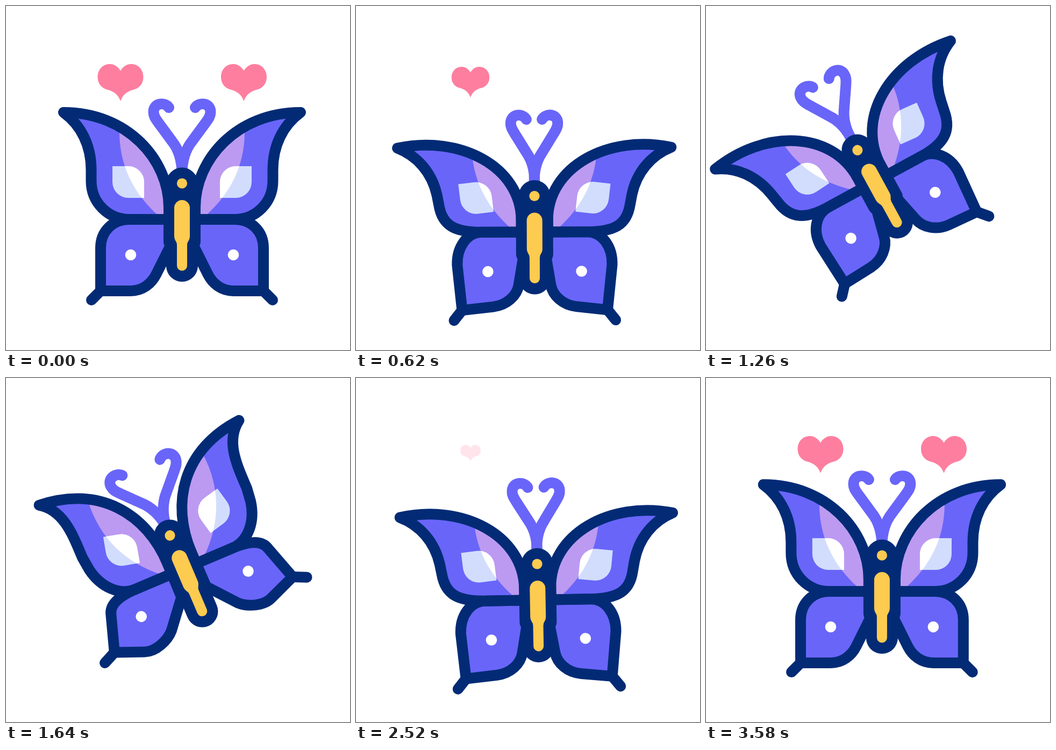
Write an HTML page with a canvas that moves like this. It is 640x640 px and loops after 3600 ms.

```html
<!DOCTYPE html>
<html lang="en">
<head>
<meta charset="utf-8">
<title>Butterfly</title>
<style>
html, body { margin: 0; width: 100%; height: 100%; overflow: hidden; background: #fff; }
canvas { display: block; width: 640px; height: 640px; }
</style>
</head>
<body>
<canvas id="stage" width="640" height="640"></canvas>
<script>
const ctx = document.getElementById('stage').getContext('2d');
const LOOP = 3600;
const NAVY = '#032b75', PURPLE = '#6965f9', LILAC = '#bc9af2', PALE = '#d2ddfd',
      GOLD = '#fdcb50', PINK = '#fe7e9f';

// Left half of the butterfly, measured from the head dot.
const REST = {
  upper: [-220.5,-132, -102.5,-132, -24.5,-45, -187.5,-108, -169,-70, -169,-25, -169,-5, -169,36, -137.5,67],
  lower: [-130,67, -151.5,90, -151.5,120, -151.5,200, -95.5,200, -74,200, -57,187, -48,169, -21.5,116],
  tail: [-168.5,217], dot: [-95.5,133], eye: [-100,-2.5, 0], feeler: [0]
};
const DOWN = {
  upper: [-255,-89.5, -139,-114.5, -25,-55, -218,-75, -190.5,-44, -181.5,-2, -178,16, -172,55, -148,67],
  lower: [-126,67, -145,95, -144,128.5, -135,212.5, -77,206, -52,203, -33,186, -29.5,165, -21,113],
  tail: [-150,231.5], dot: [-87,140.5], eye: [-109,3.5, -6.8], feeler: [4.7]
};
const UP = {
  upper: [-202,-147, -84.5,-138, -24.5,-55, -163,-121, -166,-70, -166,-25, -163,0, -156,38, -130,67],
  lower: [-125,67, -153,72, -158.5,93, -180,160, -128,181, -108,189, -80,178, -66.5,164, -25,114],
  tail: [-204,171], dot: [-108,118], eye: [-93.5,-10.4, 13.3], feeler: [-6.5]
};
const FLAPS = [[0, REST], [600, DOWN], [1000, UP], [1330, DOWN], [1640, UP], [1940, DOWN],
  [2240, UP], [2550, DOWN], [2840, UP], [3230, DOWN], [LOOP, REST]];

// time, x, y, tilt in degrees
const FLIGHT = [[0, 327.5, 330, 0], [540, 328, 350.5, 0], [620, 332, 353.5, -0.2],
  [920, 284, 267, -28.4], [1020, 267, 240, -31.5], [1330, 287, 276, -27.5],
  [1640, 305, 293, -23], [1940, 318, 306, -18.5], [2240, 325, 317, -14],
  [2520, 337, 346, -1], [2820, 322, 349, 3.6], [3020, 312, 345, 2.4],
  [3230, 313.5, 335, 0.6], [LOOP, 327.5, 330, 0]];

// time, scale
const LEFT_HEART = [[0, 1], [430, 1.37], [620, 0.83], [740, 0.3], [2440, 0.3], [2520, 0.447],
  [2700, 0.93], [2860, 1.37], [3020, 1.088], [3100, 1], [LOOP, 1]];
const RIGHT_HEART = [[0, 1], [230, 1.37], [560, 0.3], [2720, 0.3], [3020, 0.93],
  [3210, 1.37], [3440, 1], [LOOP, 1]];

const rad = deg => deg * Math.PI / 180;
const clamp = v => Math.max(0, Math.min(1, v));

function segment(keys, t) {
  let i = 0;
  while (i < keys.length - 2 && t >= keys[i + 1][0]) i++;
  return i;
}

// Monotone cubic through the keys: no overshoot, rest at every turning point.
function track(keys, t, col) {
  const rate = i => (keys[i + 1][col] - keys[i][col]) / (keys[i + 1][0] - keys[i][0]);
  const slope = i => {
    if (i === 0 || i === keys.length - 1) return 0;
    const a = rate(i - 1), b = rate(i);
    return a * b > 0 ? 2 * a * b / (a + b) : 0;
  };
  const i = segment(keys, t), span = keys[i + 1][0] - keys[i][0];
  const u = (t - keys[i][0]) / span, v = 1 - u;
  return keys[i][col] * v * v * (1 + 2 * u) + keys[i + 1][col] * u * u * (3 - 2 * u)
    + span * (slope(i) * u * v * v - slope(i + 1) * u * u * v);
}

function poseAt(t) {
  const i = segment(FLAPS, t), [t0, a] = FLAPS[i], [t1, b] = FLAPS[i + 1];
  const k = (1 - Math.cos(Math.PI * (t - t0) / (t1 - t0))) / 2;
  const pose = {};
  for (const part in a) pose[part] = a[part].map((v, n) => v + (b[part][n] - v) * k);
  return pose;
}

function paint(path, fill, line) {
  if (fill) { ctx.fillStyle = fill; ctx.fill(path); }
  if (line) { ctx.strokeStyle = line; ctx.stroke(path); }
}

function disc(x, y, r, fill) {
  const p = new Path2D();
  p.arc(x, y, r, 0, Math.PI * 2);
  paint(p, fill);
}

function upperPath(q) {
  const p = new Path2D();
  p.moveTo(q[0], q[1]);
  p.bezierCurveTo(q[2], q[3], q[4], q[5], -24.5, 45);
  p.lineTo(-24.5, 67);
  p.lineTo(-97.5, 67);
  p.bezierCurveTo(q[16], q[17], q[14], q[15], q[12], q[13]);
  p.lineTo(q[10], q[11]);
  p.bezierCurveTo(q[8], q[9], q[6], q[7], q[0], q[1]);
  p.closePath();
  return p;
}

function lowerPath(q) {
  const p = new Path2D();
  p.moveTo(-24.5, 67);
  p.lineTo(-97.5, 67);
  p.bezierCurveTo(...q.slice(0, 6));
  p.lineTo(q[6], q[7]);
  p.lineTo(q[8], q[9]);
  p.bezierCurveTo(...q.slice(10, 16));
  p.lineTo(q[16], q[17]);
  p.closePath();
  return p;
}

const sheen = new Path2D('M-112-160L-115.5-115C-122-45-95 15-44 60L-20 80L0 80L0-160Z');
const eyeShape = new Path2D('M-29.5-29.5H0A29.5 29.5 0 0 1 29.5 0V29.5H0A29.5 29.5 0 0 1-29.5 0Z');
const feelerShape = new Path2D('M-24.5-141C-32-152-53-150-53-133C-53-124-48-119-44-113L-19-79C-15-74 0-55 0-18');
const bodyShape = new Path2D('M-29.5 0A29.5 29.5 0 0 1 29.5 0L34.5 40V108Q34.5 115 29.5 121V153.5A29.5 29.5 0 0 1-29.5 153.5V121Q-34.5 115-34.5 108V40Z');
const goldShape = new Path2D('M-14.5 45.5A14.5 14.5 0 0 1 14.5 45.5V99Q14.5 103 12 107Q9.5 110 9.5 115V153A9.5 9.5 0 0 1-9.5 153V115Q-9.5 110-12 107Q-14.5 103-14.5 99Z');
const heartShape = new Path2D('M0-17C-5-25-12-29.4-19.5-29.4C-33-29.4-42.5-19-42.5-5.5C-42.5 7-35 16-23 18.5C-12 21.5-4 28 0 39.6C4 28 12 21.5 23 18.5C35 16 42.5 7 42.5-5.5C42.5-19 33-29.4 19.5-29.4C12-29.4 5-25 0-17Z');

function drawEye([x, y, turn], fill) {
  ctx.save();
  ctx.translate(x, y);
  ctx.rotate(rad(turn));
  paint(eyeShape, fill);
  ctx.restore();
}

function drawFeeler(pose) {
  ctx.save();
  ctx.translate(0, -20);
  ctx.rotate(rad(pose.feeler[0]));
  ctx.translate(0, 20);
  paint(feelerShape, null, PURPLE);
  ctx.restore();
}

function drawWings(pose) {
  const upper = upperPath(pose.upper), lower = lowerPath(pose.lower);
  paint(lower, PURPLE);
  paint(upper, PURPLE);

  ctx.save();
  ctx.clip(upper);
  paint(sheen, LILAC);
  drawEye(pose.eye, PALE);
  ctx.clip(sheen);
  drawEye(pose.eye, '#fff');
  ctx.restore();

  paint(lower, null, NAVY);
  paint(upper, null, NAVY);
  const tail = new Path2D();
  tail.moveTo(pose.lower[6], pose.lower[7]);
  tail.lineTo(...pose.tail);
  paint(tail, null, NAVY);
  disc(...pose.dot, 10.3, '#fff');
}

function bothSides(draw, pose) {
  for (const side of [1, -1]) {
    ctx.save();
    ctx.scale(side, 1);
    draw(pose);
    ctx.restore();
  }
}

function drawHeart(x, scale) {
  const alpha = clamp((scale - 0.35) / 0.48);
  if (!alpha) return;
  ctx.save();
  ctx.globalAlpha = alpha;
  ctx.translate(x, 137.4);
  ctx.scale(scale, scale);
  paint(heartShape, PINK);
  ctx.restore();
}

function drawButterfly(t) {
  const pose = poseAt(t);
  ctx.save();
  ctx.translate(track(FLIGHT, t, 1), track(FLIGHT, t, 2));
  ctx.rotate(rad(track(FLIGHT, t, 3)));
  ctx.lineWidth = 20;
  ctx.lineCap = ctx.lineJoin = 'round';
  bothSides(drawFeeler, pose);
  bothSides(drawWings, pose);
  paint(bodyShape, NAVY);
  paint(goldShape, GOLD);
  disc(0, 0, 9.6, GOLD);
  ctx.restore();
}

function render(now) {
  const t = now % LOOP;
  ctx.fillStyle = '#fff';
  ctx.fillRect(0, 0, 640, 640);
  drawHeart(213, track(LEFT_HEART, t, 1));
  drawHeart(442.5, track(RIGHT_HEART, t, 1));
  drawButterfly(t);
}

let start;
function tick(now) {
  start ??= now;
  render(Math.max(0, now - start));
  requestAnimationFrame(tick);
}
render(0);
requestAnimationFrame(tick);
</script>
</body>
</html>
```
